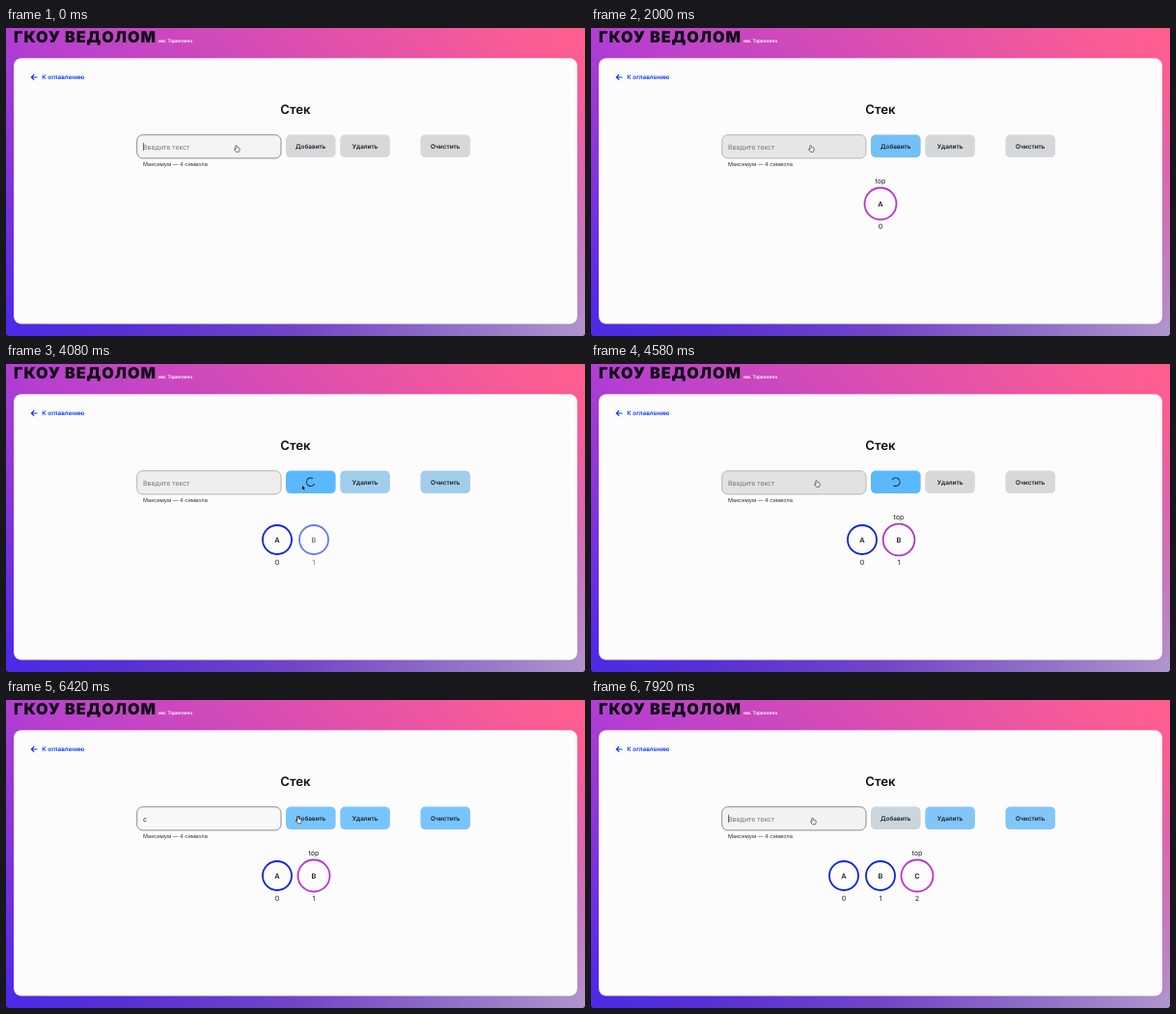
Animation, 600 px wide and 319 px high, one loop 8 s. Source, as an HTML page:

```html
<!DOCTYPE html>
<html lang="ru">
<head>
<meta charset="utf-8">
<title>Стек</title>
<style>
  html, body { margin: 0; width: 100%; height: 100%; overflow: hidden; background: #1c1830; }
  svg { display: block; width: 100vw; height: 100vh; font-family: Inter, "Open Sans", sans-serif; }
  text { text-rendering: geometricPrecision; }
  .mid { text-anchor: middle; }
  .semi { font-weight: 600; }
</style>
</head>
<body>
<svg id="stage" viewBox="0 0 600 319" preserveAspectRatio="none">
  <defs>
    <linearGradient id="sky" gradientUnits="userSpaceOnUse" x1="70" y1="389" x2="530" y2="-70">
      <stop offset="0" stop-color="#4928ea"/>
      <stop offset=".36" stop-color="#b73fd0"/>
      <stop offset=".92" stop-color="#fb5c94"/>
      <stop offset="1" stop-color="#ff5f8e"/>
    </linearGradient>
    <radialGradient id="haze" gradientUnits="userSpaceOnUse" cx="600" cy="319" r="270">
      <stop offset="0" stop-color="#b094cc"/>
      <stop offset="1" stop-color="#c478c4" stop-opacity="0"/>
    </radialGradient>
    <linearGradient id="floor">
      <stop offset="0" stop-color="#4c2ae8"/>
      <stop offset=".2" stop-color="#5730d4"/>
      <stop offset=".5" stop-color="#7046c8"/>
      <stop offset=".8" stop-color="#9474c8"/>
      <stop offset="1" stop-color="#b094cc"/>
    </linearGradient>
  </defs>
  <rect y="-8" width="600" height="327" rx="4" fill="url(#sky)"/>
  <rect y="-8" width="600" height="327" rx="4" fill="url(#haze)"/>
  <rect y="303" width="600" height="16" rx="4" fill="url(#floor)"/>
  <text x="8" y="15" font-size="16.2" font-weight="900" letter-spacing=".95" fill="#0c0c14">ГКОУ ВЕДОЛОМ</text>
  <text x="158" y="14.8" font-size="4.8" font-weight="600" fill="#fff">им. Торвелино</text>
  <rect x="8" y="31.2" width="584" height="275.4" rx="8" fill="#fcfcfc"/>
  <path d="M32.5 51H26.4m2.8-2.9L26.3 51l2.9 2.9" fill="none" stroke="#0032ff" stroke-width="1.1"/>
  <text x="37.3" y="53.3" class="semi" font-size="6.3" fill="#0032ff">К оглавлению</text>
  <text x="300" y="88.6" class="mid semi" font-size="13.2" fill="#111">Стек</text>
  <rect id="field" x="135.7" y="110.7" width="149.3" height="24.2" rx="6" stroke-width=".75"/>
  <text id="value" x="142" y="125.6" font-size="7"></text>
  <rect id="caret" x="142" y="118.7" width=".6" height="8.3" fill="#222"/>
  <text x="142" y="143.2" font-size="5.6" fill="#333">Максимум — 4 символа</text>
  <g id="buttons"></g>
  <path id="spinner" d="M315.8 117.9A4.3 4.3 0 1 0 320.1 122.2" fill="none" stroke="#1c2a3a" stroke-width="1"/>
  <g id="stack"></g>
  <g id="pointer">
    <path id="hand" transform="scale(.88)" d="M-1.4-3.6c.8-.5 1.2 0 1.3.6l.2 1.5 2.2.5c.7.2 1 .7.9 1.4l-.4 2.1-.7 1.3h-3L-3.1 1.2c-.4-.7.3-1.2.9-.8l.7.6-.4-3.7z" fill="#fff" stroke="#222" stroke-width=".75" stroke-linejoin="round"/>
    <path id="arrow" d="M-.8-3v6l1.4-1.2 1 2.1 1.1-.5-1-2h1.8z" fill="#111" stroke="#fff" stroke-width=".4"/>
  </g>
</svg>
<script>
const LOOP = 8000, LOAD = 1000;
const $ = id => document.getElementById(id);
const set = (el, attrs) => { for (const k in attrs) el.setAttribute(k, attrs[k]); };
const make = (parent, tag, attrs, text = '') => {
  const el = document.createElementNS('http://www.w3.org/2000/svg', tag);
  set(el, attrs);
  el.textContent = text;
  return parent.appendChild(el);
};
const clamp = v => Math.max(0, Math.min(1, v));
const smooth = p => p * p * (3 - 2 * p);

// CSS "ease": cubic-bezier(.25, .1, .25, 1)
function ease(x) {
  let lo = 0, hi = 1, s = .5;
  for (let i = 0; i < 16; i++) {
    s = (lo + hi) / 2;
    if (.75 * s * (1 - s) + s ** 3 < x) lo = s; else hi = s;
  }
  return .3 * s * (1 - s) ** 2 + 3 * s * s * (1 - s) + s ** 3;
}

const rgb = hex => [1, 3, 5].map(i => parseInt(hex.slice(i, i + 2), 16));
const mix = (a, b, p) =>
  `rgb(${rgb(a).map((v, i) => Math.round(v + (rgb(b)[i] - v) * p))})`;

// Colour of a track of [time, colour] changes, each with a CSS-like transition
function colour(track, t, span = 500) {
  let i = track.length - 1;
  while (i > 0 && track[i][0] > t) i--;
  const [start, now] = track[i];
  return i ? mix(track[i - 1][1], now, ease(clamp((t - start) / span))) : now;
}

const GREY = '#d8d8d8', BLUE = '#78c4fc', HOVER = '#5ab8ff';
const rounds = [
  { letter: 'a', typed: 250, hover: 700, click: 920, end: 1920, focus: 2170 },
  { letter: 'b', typed: 2970, hover: 3500, click: 3950, end: 4920, focus: 5080 },
  { letter: 'c', typed: 5850, hover: 6430, click: 6610, end: 7610, focus: 7840 }
];
const addTrack = [[0, GREY]], otherTrack = [[0, GREY]];
const fieldTrack = [[0, '#f4f4f4']], edgeTrack = [[0, '#6a6a6a']];
rounds.forEach((r, i) => {
  addTrack.push([r.typed, BLUE], [r.hover, HOVER], [r.end, GREY]);
  otherTrack.push([r.click, GREY], [r.end + (i ? 0 : 60), BLUE]);
  fieldTrack.push([r.typed, '#f8f8f8'], [r.click, '#e2e2e2'], [r.end, '#f4f4f4']);
  edgeTrack.push([r.click, '#a4a4a4'], [r.end + 80, '#6a6a6a']);
});

const path = [
  [0, 239, 125], [250, 241, 125], [750, 306, 126], [1050, 307, 128],
  [1650, 228, 125], [2180, 228, 125], [2420, 241, 125], [2920, 243, 125],
  [3080, 262, 125], [3560, 306, 126], [4090, 307, 128], [4700, 226, 123.5],
  [5850, 226, 123.5], [6060, 236, 124], [6420, 303, 124.5], [6760, 306, 127],
  [7360, 230, 125.5], [8000, 230, 125.5]
];
function pointerAt(t) {
  const i = path.findIndex(p => p[0] > t);
  const [t0, x0, y0] = path[i - 1], [t1, x1, y1] = path[i];
  const p = smooth((t - t0) / (t1 - t0));
  return [x0 + (x1 - x0) * p, y0 + (y1 - y0) * p];
}

const buttons = [['Добавить', 290], ['Удалить', 346.3], ['Очистить', 429.5]].map(([label, x]) => ({
  box: make($('buttons'), 'rect', { x, y: 110.5, width: 51.6, height: 23.6, rx: 5 }),
  label: make($('buttons'), 'text', {
    x: x + 25.8, y: 124.7, class: 'mid semi', 'font-size': 6.4, fill: '#14202c'
  }, label)
}));

const nodes = rounds.map(({ letter }, i) => {
  const g = make($('stack'), 'g', {});
  const text = (y, size, str, cls = 'mid') =>
    make(g, 'text', { y, class: cls, 'font-size': size, fill: '#222' }, str);
  const ring = make(g, 'circle', { cy: 182, fill: 'none', 'stroke-width': 1.8 });
  text(184.7, 7.4, letter.toUpperCase(), 'mid semi');
  text(208, 7.2, i);
  return { g, ring, top: text(160.8, 7.2, 'top') };
});

function render(t) {
  const count = rounds.filter(r => t >= r.click).length;
  const busy = rounds.some(r => t >= r.click && t < r.end);
  const typing = rounds.find(r => t >= r.typed && t < r.click);

  set($('field'), { fill: colour(fieldTrack, t), stroke: colour(edgeTrack, t, 200) });
  $('value').textContent = typing ? typing.letter : 'Введите текст';
  set($('value'), { fill: typing ? '#222' : '#777' });

  // The caret restarts its blink on focus and on typing
  const since = Math.max(0, ...rounds.flatMap(r => [r.typed, r.focus]).filter(s => s <= t));
  const focused = !busy && !rounds.some(r => t >= r.end && t < r.focus);
  const caretOn = focused && (t - since) % 1000 < 500;
  set($('caret'), { x: typing ? 146.4 : 142, opacity: caretOn ? 1 : 0 });

  buttons.forEach((b, i) => set(b.box, { fill: colour(i ? otherTrack : addTrack, t) }));
  set(buttons[0].label, { opacity: busy ? 0 : 1 });
  set($('spinner'), {
    opacity: busy ? 1 : 0,
    transform: `rotate(${(t % LOAD) / LOAD * 360} 315.8 122.2)`
  });

  nodes.forEach((n, i) => {
    const age = t - rounds[i].click;
    const isTop = i === count - 1 && age >= LOAD / 2;
    const p = isTop ? ease(clamp((age - LOAD / 2) / 200)) : 0;
    set(n.g, {
      transform: `translate(${300 + 38 * (i - (count - 1) / 2)} 0)`,
      opacity: i < count ? clamp(.2 + age / 330) : 0
    });
    set(n.ring, { r: 15 + 1.5 * p, stroke: mix('#0a26dc', '#c034cc', p) });
    set(n.top, { opacity: isTop ? 1 : 0 });
  });

  const [x, y] = pointerAt(t);
  const plain = busy && x > 286;
  set($('pointer'), { transform: `translate(${x + .4} ${y})` });
  set($('hand'), { opacity: plain ? 0 : 1 });
  set($('arrow'), { opacity: plain ? 1 : 0 });
}

const origin = performance.now();
function tick() {
  render((performance.now() - origin) % LOOP);
  requestAnimationFrame(tick);
}
tick();
</script>
</body>
</html>
```
